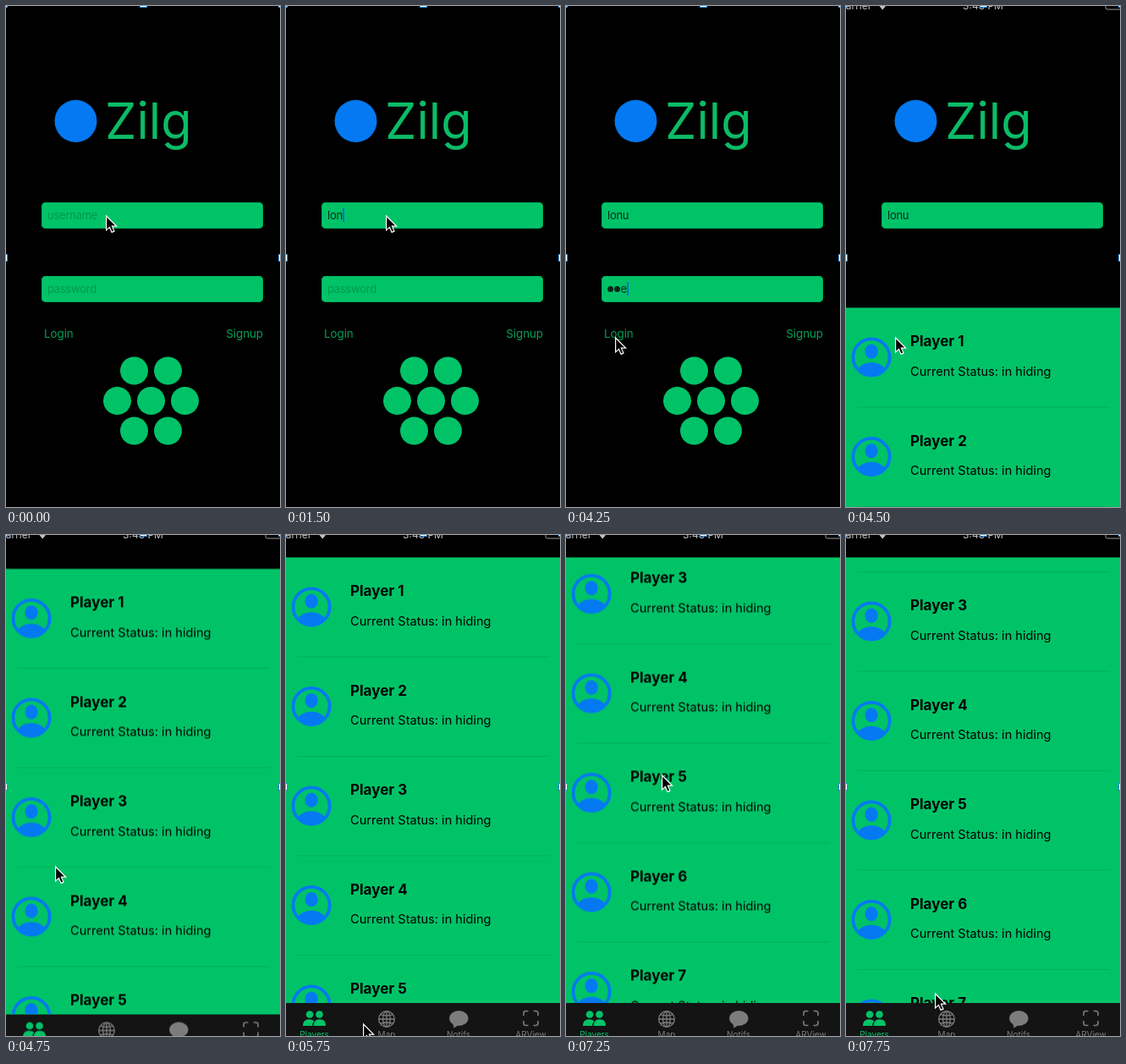
An HTML page for the animation above (8000 ms loop, 324x592 px).

```html
<!DOCTYPE html>
<html lang="en">
<head>
<meta charset="utf-8">
<title>Login and player list</title>
<style>
  :root { --green: #00c368; --blue: #0479f2; --gray: #7c7c7c; }
  html, body { margin: 0; width: 100%; height: 100%; overflow: hidden; background: #000; }
  #stage { position: relative; width: 324px; height: 592px; overflow: hidden; background: #000;
    font-family: Inter, Roboto, sans-serif; }
  #stage > * { position: absolute; }
  svg.layer { left: 0; top: 0; width: 324px; height: 592px; }
  text { font-family: Inter, Roboto, sans-serif; }

  .field { left: 42px; width: 262px; height: 31px; border-radius: 5px; overflow: hidden;
    background: var(--green); box-shadow: inset 0 0 0 1px #00b05e; }
  .strip div { height: 31px; padding-left: 7px; font-size: 13px; line-height: 31px;
    letter-spacing: -.25px; white-space: pre; color: #06291a; }
  .strip .hint { color: #00984f; }
  .strip i { display: inline-block; width: 2px; height: 16px; margin: 0 -2px 0 0;
    vertical-align: -3px; background: #0a6fd2; }
  .strip b { display: inline-block; width: 7px; height: 7px; margin-right: .7px;
    border-radius: 50%; background: #06291a; vertical-align: 1px; }

  .play { animation: 8s step-end infinite; }
  #user { animation-name: user; }
  #pass { animation-name: pass; }
  #modal { animation-name: modal; }
  #status { animation-name: status; }
  #rows { animation-name: scroll; }
  #cursor { left: 0; top: 0; overflow: visible; animation-name: cursor; }

  @keyframes user {
    0% { transform: none; }
    3.125% { transform: translateY(-31px); }
    12.5% { transform: translateY(-62px); }
    15.625% { transform: translateY(-93px); }
    18.75% { transform: translateY(-124px); }
    25% { transform: translateY(-155px); }
    31.25%, 100% { transform: translateY(-186px); }
  }
  @keyframes pass {
    0% { transform: none; }
    31.25% { transform: translateY(-31px); }
    34.375%, 100% { transform: translateY(-62px); }
  }
  @keyframes modal {
    0% { transform: translateY(640px); }
    56.25% { transform: translateY(330px); }
    59.375% { transform: translateY(13.5px); }
    62.5%, 100% { transform: none; }
  }
  @keyframes status {
    0% { opacity: 0; }
    56.25%, 100% { opacity: 1; }
  }
  @keyframes scroll {
    0% { transform: none; }
    78.125% { transform: translateY(-60px); }
    81.25% { transform: translateY(-140px); }
    84.375% { transform: translateY(-196px); }
    87.5% { transform: translateY(-236px); }
    90.625% { transform: translateY(-250.5px); }
    93.75% { transform: translateY(-231px); }
    96.875%, 100% { transform: translateY(-218px); }
  }
  @keyframes cursor {
    0% { transform: translate(118px, 247px); }
    40.625% { transform: translate(121px, 260px); }
    43.75% { transform: translate(106px, 304px); }
    46.875% { transform: translate(76px, 356px); }
    50% { transform: translate(48px, 386px); }
    53.125% { transform: translate(58px, 391px); }
    68.75% { transform: translate(76px, 490px); }
    71.875% { transform: translate(91px, 577px); }
    75% { transform: translate(100px, 542px); }
    78.125% { transform: translate(105px, 480px); }
    81.25% { transform: translate(109px, 400px); }
    84.375% { transform: translate(111px, 342px); }
    87.5% { transform: translate(113px, 300px); }
    90.625% { transform: translate(113px, 283px); }
    93.75% { transform: translate(109px, 430px); }
    96.875%, 100% { transform: translate(105px, 541px); }
  }

  .handle { width: 7px; height: 7px; border: 1px solid #2c86dc; background: #fff; }
</style>
</head>
<body>
<div id="stage">
  <svg class="layer" viewBox="0 0 324 592">
    <circle cx="82.5" cy="136" r="25" fill="#0479f2"/>
    <text x="117" y="156.5" font-size="59.5" fill="#0cbb66">Zilg</text>
    <g font-size="13.3" fill="#06a158">
      <text x="45" y="391.5">Login</text>
      <text x="304" y="391.5" text-anchor="end">Signup</text>
    </g>
    <g fill="#00c368">
      <circle cx="151.5" cy="431" r="16.5"/><circle cx="191.5" cy="431" r="16.5"/>
      <circle cx="131.5" cy="466.5" r="16.5"/><circle cx="171.5" cy="466.5" r="16.5"/>
      <circle cx="211.5" cy="466.5" r="16.5"/>
      <circle cx="151.5" cy="502" r="16.5"/><circle cx="191.5" cy="502" r="16.5"/>
    </g>
  </svg>

  <div class="field" style="top:232px"><div id="user" class="strip play">
    <div class="hint">username</div>
    <div class="hint"><i></i>username</div>
    <div>l<i></i></div>
    <div>lo<i></i></div>
    <div>lon<i></i></div>
    <div>lonu<i></i></div>
    <div>lonu</div>
  </div></div>
  <div class="field" style="top:319px"><div id="pass" class="strip play">
    <div class="hint">password</div>
    <div><b></b>o<i></i></div>
    <div><b></b><b></b>e<i></i></div>
  </div></div>

  <svg class="layer" viewBox="0 0 324 592">
    <defs>
      <clipPath id="view"><rect y="26.5" width="324" height="526.5"/></clipPath>
      <g id="avatar" fill="#0479f2">
        <circle r="21.6" fill="none" stroke="#0479f2" stroke-width="3.8"/>
        <ellipse cy="-6.8" rx="7.6" ry="8.6"/>
        <path d="M-16.5 14.5C-13 9 -7 6.3 0 6.3S13 9 16.5 14.5A22 22 0 0 1 -16.5 14.5Z"/>
      </g>
    </defs>
    <g id="modal" class="play">
      <rect y="-14" width="324" height="640"/>
      <rect y="26.5" width="324" height="527" fill="#00c368"/>
      <g clip-path="url(#view)"><g id="rows" class="play"></g></g>
      <rect y="553" width="324" height="60" fill="#141414"/>
      <g fill="#00c368">
        <circle cx="28" cy="566.5" r="4.3"/><circle cx="39.5" cy="566.5" r="4.3"/>
        <path d="M20 580C20 575 23 572.3 27.5 572.3C30 572.3 32 573.2 33.2 574.6C31.8 576.2 31.2 578 31.2 580Z"/>
        <path d="M32.6 580C32.6 575 35.5 572.3 40 572.3S47 575 47 580Z"/>
      </g>
      <g fill="none" stroke="#7c7c7c" stroke-width="1.3">
        <circle cx="119" cy="572" r="9.3"/>
        <ellipse cx="119" cy="572" rx="4.4" ry="9.3"/>
        <path d="M119 562.7V581.3M109.7 572H128.3M111.8 566.6Q119 569.4 126.2 566.6M111.8 577.4Q119 574.6 126.2 577.4"/>
        <path stroke-width="1.6" d="M281 568V565Q281 562.5 283.5 562.5H286.5M292.5 562.5H295.5Q298 562.5 298 565V568M298 574V577Q298 579.5 295.5 579.5H292.5M286.5 579.5H283.5Q281 579.5 281 577V574"/>
      </g>
      <g fill="#7c7c7c">
        <ellipse cx="204.3" cy="571" rx="11.2" ry="9"/>
        <path d="M197 576L198.5 582.5L206 578Z"/>
      </g>
      <g font-size="10" text-anchor="middle" fill="#7c7c7c">
        <text x="33.5" y="593.5" fill="#00c368">Players</text>
        <text x="119" y="593.5">Map</text>
        <text x="204" y="593.5">Notifs</text>
        <text x="289.5" y="593.5">ARView</text>
      </g>
    </g>
    <g id="status" class="play" font-size="12" fill="#c4c4c4">
      <text x="-9" y="4">Carrier</text>
      <text x="162" y="4" text-anchor="middle">3:48 PM</text>
      <path d="M39.5 0H47L43.2 4.5Z"/>
      <path d="M307 -4V2Q307 4 309 4H330" fill="none" stroke="#999"/>
    </g>
  </svg>

  <div class="handle" style="left:-7px;top:-7px"></div>
  <div class="handle" style="left:158px;top:-7px"></div>
  <div class="handle" style="left:322px;top:-7px"></div>
  <div class="handle" style="left:-7px;top:293px"></div>
  <div class="handle" style="left:322px;top:293px"></div>

  <svg id="cursor" class="play" width="16" height="22">
    <path d="M.6 1V18L4.5 14.4L7.1 20.4L10 19.1L7.4 13.2H12.6Z" fill="#000" stroke="#fff" stroke-width="1.2"/>
  </svg>
</div>
<script>
  const ROW_HEIGHT = 117.5;
  const row = i => `
    <g transform="translate(0 ${26.5 + i * ROW_HEIGHT})">
      <use href="#avatar" x="30" y="58.5"/>
      <text x="76" y="45.5" font-size="17" font-weight="700">Player ${i + 1}</text>
      <text x="76" y="80" font-size="14.6">Current Status: in hiding</text>
      <path d="M13 117.5H312" stroke="#00ad5b"/>
    </g>`;
  document.getElementById('rows').innerHTML = Array.from({ length: 8 }, (_, i) => row(i)).join('');
</script>
</body>
</html>
```
